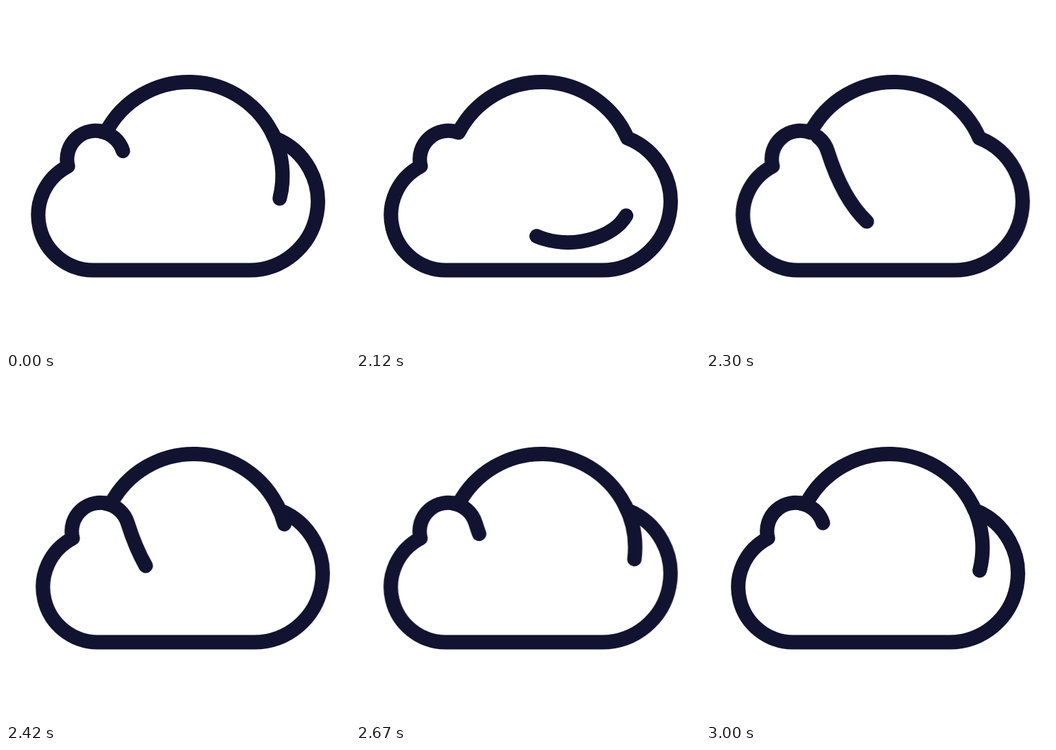
Write an HTML page that moves like this. It is 500 px wide and 500 px high and loops after 3.02 s.

```html
<!DOCTYPE html>
<html lang="en">
<head>
<meta charset="utf-8">
<title>Cloud</title>
<style>
  html, body { margin: 0; width: 100%; height: 100%; overflow: hidden; background: #fff; }
  svg { display: block; width: 100%; height: 100%; }
  path { fill: none; stroke: #121331; stroke-width: 21; stroke-linecap: round; stroke-linejoin: round; }
</style>
</head>
<body>
<svg viewBox="0 0 500 500">
  <g id="cloud">
    <path d="M90 233 A41.5 41.5 0 0 1 145 184 A136 136 0 0 1 390.5 192
             A99.5 99.5 0 0 1 354 384 H126 A80 80 0 0 1 90 233 Z"/>
    <path id="swirl" d="M137.2 182.1 A41.5 41.5 0 0 1 170 211 C182 249 210 322 271 339
             C320 353 378 333 391.6 298.5 A136 136 0 0 0 387.2 184.8"/>
  </g>
</svg>
<script>
  const LOOP = 3020;
  const cloud = document.getElementById('cloud');
  const swirl = document.getElementById('swirl');

  // steps: [time in ms, value, easing to the next step]
  function loop(el, prop, steps) {
    const frames = steps.map(([ms, value, easing = 'linear']) =>
      ({ offset: ms / LOOP, [prop]: value, easing }));
    const anim = el.animate(frames, { duration: LOOP, iterations: Infinity });
    anim.startTime = document.timeline.currentTime;
  }

  // One dash runs backwards once around the inner curve and wraps at its ends.
  const length = swirl.getTotalLength();
  const dash = 143.5, rest = 98;
  swirl.style.strokeDasharray = `${dash} ${length - dash}`;

  loop(swirl, 'strokeDashoffset', [
    [0, `${rest}px`],
    [1995, `${rest}px`, 'cubic-bezier(.19, .19, 0, 1)'],
    [2995, `${rest + length}px`],
    [LOOP, `${rest + length}px`]
  ]);

  const shift = x => `translate(${x}px, 0px)`;
  loop(cloud, 'transform', [
    [0, shift(0)],
    [1995, shift(0), 'cubic-bezier(.33, .67, .67, 1)'],
    [2365, shift(7), 'cubic-bezier(.37, 0, .63, 1)'],
    [3000, shift(0)],
    [LOOP, shift(0)]
  ]);
</script>
</body>
</html>
```
